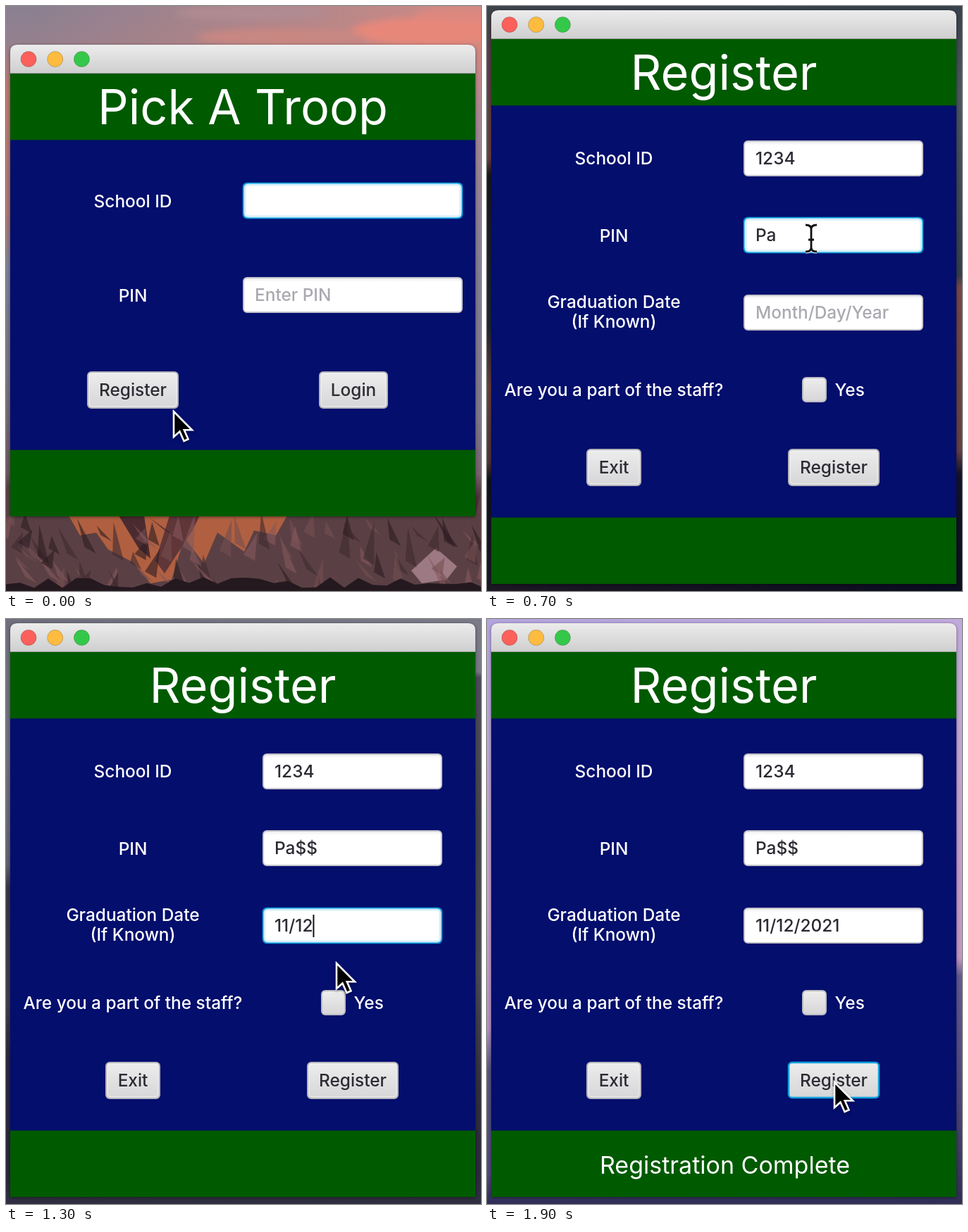
These frames come from a looping animation (674 by 831 pixels, 2 s). An HTML page:

```html
<!DOCTYPE html>
<html lang="en">
<head>
<meta charset="utf-8">
<title>Registration form</title>
<style>
  html, body { margin: 0; width: 100%; height: 100%; overflow: hidden; }
  #stage { position: relative; width: 674px; height: 831px; overflow: hidden; background: #111; }
  .wall, .wall div, svg { position: absolute; inset: 0; }
  .wall .right { mask-image: linear-gradient(90deg, transparent 5%, #000 95%); }
  svg { display: block; font: 450 24.4px Inter, sans-serif; font-optical-sizing: none; }
  .window { filter: drop-shadow(0 1px 2px #0007); }
</style>
</head>
<body>
<div id="stage"></div>
<script>
const STEP = 100, STEPS = 20;
const GREEN = '#005a00', BLUE = '#030e6d', INK = '#2b2b33', PROMPT = '#a9a9b0', FOCUS = '#0fa0dc';

// Wallpapers: step at which each is fully visible, vertical colours at the left and right edges
const walls = [
  { at: 0, left: '#8a8092 0,#94808e 6%,#b9776f 14%,#a87570 36%,#7c7f96 45%,#75707e 65%,#6b5560 80%,#49302f 84%,#3d272c',
    right: '#cb8a86 0,#cf8881 7%,#a58794 20%,#817d94 45%,#7d778a 70%,#77626e 80%,#4b3238 84%,#39252c' },
  { at: 1, left: '#a06f6c 0,#b9776f 12%,#a87570 30%,#7c7f96 45%,#75707e 65%,#6b5560 80%,#49302f 82%,#21191e',
    right: '#c3837f 0,#a58794 12%,#817d94 35%,#7d778a 70%,#77626e 80%,#4b3238 82%,#21191e' },
  { at: 4, left: '#a59aa5 0,#aa6049 3%,#a15540 28%,#2a2830 30%,#454a5a 40%,#4e5264 60%,#b0603f 65%,#a95739 77%,#171a2a 80%,#3a2524',
    right: '#ad9da8 0,#918097 10%,#6f677b 46%,#c46b50 47%,#bc6850 77%,#1e1b29 80%,#111522' },
  { at: 7, left: '#3d444c 0,#564046 8%,#694042 26%,#171721 29%,#202536 55%,#67403f 65%,#503438 78%,#101222 81%,#1d1724',
    right: '#38424c 0,#4d5560 15%,#343d4b 46%,#754846 48%,#663f43 76%,#11132a 80%,#0b0d20' },
  { at: 11, left: '#0b0b28 0,#10102c 30%,#0a0a1c 50%,#090a29 80%,#080927',
    right: '#0b0b28 0,#161524 25%,#0b0b16 55%,#0a0b20 80%,#080927' },
  { at: 15, left: '#d2d2d3 0,#cdcdce 25%,#b5b4b7 42%,#66616a 46%,#77717b 65%,#4a454f 75%,#4a464f 95%,#5a575e',
    right: '#e8e8e8 0,#e2e2e2 9%,#88868c 10%,#77737b 35%,#8b8790 60%,#57525c 80%,#4b4852 95%,#5a575e' },
  { at: 19, left: '#b3a5dd 0,#b7a5d5 20%,#c79dc9 50%,#b18fc4 70%,#575485 77%,#4c4a7b 95%,#302e58',
    right: '#c0a9dc 0,#c3a4d0 25%,#c596c0 58%,#625b8c 61%,#4c4979 80%,#302e58' },
];

const stage = document.getElementById('stage');
stage.innerHTML = walls.map(w =>
  `<div class="wall"><div style="background:linear-gradient(${w.left})"></div>
   <div class="right" style="background:linear-gradient(${w.right})"></div></div>`).join('') +
  '<svg width="674" height="831" viewBox="0 0 674 831"></svg>';
const wallNodes = stage.querySelectorAll('.wall');
const svg = stage.querySelector('svg');

const defs = `<defs>
  <linearGradient id="bar" x2="0" y2="1"><stop stop-color="#ececec"/><stop offset="1" stop-color="#cecece"/></linearGradient>
  <linearGradient id="button" x2="0" y2="1"><stop stop-color="#ededed"/><stop offset="1" stop-color="#d6d6d8"/></linearGradient>
  <linearGradient id="field" x2="0" y2="1"><stop stop-color="#ececee"/><stop offset=".12" stop-color="#fff"/></linearGradient>
  <filter id="soft"><feGaussianBlur stdDeviation="5"/></filter>
  </defs>`;

const polygon = (points, fill) => `<polygon points="${points}" fill="${fill}"/>`;

function drawScenery() {
  const random = i => { const s = Math.sin(i * 91.7 + 4.3) * 43758.5453; return s - Math.floor(s); };
  let out = `<g filter="url(#soft)">
    <ellipse cx="600" cy="36" rx="110" ry="20" fill="#e7877a"/>
    <ellipse cx="640" cy="12" rx="60" ry="9" fill="#dd887f"/>
    <ellipse cx="390" cy="44" rx="120" ry="12" fill="#c98782"/>
    <ellipse cx="350" cy="10" rx="110" ry="10" fill="#b08b92"/></g>`;
  out += polygon('0,690 8,676 6,724 666,724 674,690 674,831 0,831', '#5a4044');
  out += polygon('88,722 400,722 383,752 352,745 338,775 300,748 281,792 253,755 235,815 205,820 180,790 145,772 128,748 105,752', '#b06040');
  out += polygon('160,724 196,724 205,785 188,770', '#4b2b30');
  out += polygon('232,724 275,724 264,746 225,806 212,788', '#603638');
  out += polygon('575,802 610,770 640,796 625,815 590,820', '#9c7983');
  for (let i = 0; i < 90; i++) {
    const x = random(i) * 690 - 10, y = 718 + random(i + 100) * 95, h = 20 + random(i + 200) * 40;
    const lean = random(i + 300) * 44 - 18;
    const fill = ['#2c1c22', '#85595c', '#3f2a31', '#744e50'][i % 4];
    out += `<path d="M${x} ${y}l${12 + lean} ${h}l-16 -9z" fill="${fill}" opacity=".6"/>`;
  }
  let ridge = '0,831 0,815';
  for (let x = 0; x <= 680; x += 20) ridge += ` ${x},${811 + random(x + 7) * 17}`;
  return out + polygon(ridge + ' 674,831', '#24191f');
}
const scenery = drawScenery();

const text = (x, y, content, { fill = '#fff', size = 24.4, weight = 450, anchor = 'middle', id = '' } = {}) =>
  `<text x="${x}" y="${y}" fill="${fill}" font-size="${size}" font-weight="${weight}" text-anchor="${anchor}"${id && ` id="${id}"`}>${content}</text>`;

const box = (x, y, w, h, fill, stroke, width = 2) =>
  `<rect x="${x + 1}" y="${y + 1}" width="${w - 2}" height="${h - 2}" rx="5" fill="${fill}" stroke="${stroke}" stroke-width="${width}"/>`;

function field(x, y, w, value, prompt, focused) {
  const frame = focused
    ? box(x, y, w, 51, '#fff', FOCUS, 2.5) + box(x + 2, y + 2, w - 4, 47, 'none', '#d5effa', 3)
    : box(x, y, w, 51, 'url(#field)', '#c3c3cb');
  const shown = value || (focused ? '' : prompt);
  return frame + text(x + 17, y + 34, shown,
    { fill: value ? INK : PROMPT, anchor: 'start', id: focused ? 'typed' : '' });
}

function button(cx, y, w, label, focused) {
  const x = cx - w / 2;
  const frame = focused
    ? box(x, y, w, 52, 'url(#button)', FOCUS, 2.5)
    : box(x, y, w, 53, 'url(#button)', '#b4b4ba') + box(x + 2, y + 2, w - 4, 49, 'none', '#f3f3f3', 1);
  return frame + text(cx, y + 34.5, label, { fill: INK });
}

function windowFrame(top, bottom, title) {
  const head = top + 41, body = head + 95, foot = bottom - 94;
  const dots = ['#fc605b', '#fdbc40', '#34c84a'].map((color, i) =>
    `<circle cx="${32 + i * 37.7}" cy="${top + 20.5}" r="11" fill="${color}" stroke="#0003"/>`).join('');
  return `<g class="window"><path d="M6 ${head}V${top + 10}q0 -10 10 -10H656q10 0 10 10V${head}z" fill="url(#bar)"/>
    <rect x="6" y="${head}" width="660" height="${bottom - head}" fill="${GREEN}"/></g>
    <rect x="6" y="${body - 1}" width="660" height="${foot - body + 1}" fill="${BLUE}"/>
    <path d="M6 ${head - .5}H666" stroke="#9b9b9b"/>
    <path d="M6 ${body - .5}H666M6 ${foot - .5}H666" stroke="#08263a"/>
    ${dots}${text(336, top + 113, title, { size: 68.5, weight: 400 })}`;
}

const arrow = (x, y) => `<path transform="translate(${x} ${y})" d="M1 1V37L9.5 29.5L15.5 43L21.5 40.3L15.8 27.3H27z"
  fill="#000" stroke="#fff" stroke-width="2.6" style="filter:drop-shadow(0 2px 2px #0005)"/>`;

function beam(x, y) {
  const d = 'M-8 -19Q0 -19 0 -13V13Q0 19 -8 19M8 -19Q0 -19 0 -13M0 13Q0 19 8 19M-4 2H4';
  return ['stroke="#fff" stroke-width="5"', 'stroke="#111" stroke-width="2.8"']
    .map(style => `<path transform="translate(${x} ${y})" d="${d}" fill="none" ${style}/>`).join('');
}

// One pointer pose per step
const pointers = [
  [arrow, 237, 575], [arrow, 188, 547], [beam, 440, 219], [beam, 440, 219], [arrow, 452, 290],
  [beam, 460, 330], [beam, 460, 330], [beam, 460, 330], [beam, 460, 330], [beam, 460, 345],
  [beam, 466, 436], [arrow, 468, 488], [arrow, 468, 488], [arrow, 468, 488], [arrow, 468, 488],
  [arrow, 468, 488], [arrow, 468, 488], [arrow, 480, 575], [arrow, 492, 657], [arrow, 492, 657],
];

const entries = {
  id: { start: 2, end: 5, typed: ['', '12', '1234'] },
  pin: { start: 5, end: 10, typed: ['', 'P', 'Pa', 'Pa$', 'Pa$$'] },
  date: { start: 10, end: 18, typed: ['', '11', '11/', '11/12', '11/12/20', '11/12/202', '11/12/2021'] },
};

function entryField(step, { start, end, typed }, y, prompt) {
  const value = step < start ? '' : typed[Math.min(step - start, typed.length - 1)];
  return field(364, y, 255, value, prompt, step >= start && step < end);
}

const loginForm = () => windowFrame(55, 725, 'Pick A Troop') +
  text(180, 285.5, 'School ID') + field(336, 251, 312, '', 'Enter School ID', true) +
  text(180, 419.5, 'PIN') + field(336, 385, 312, '', 'Enter PIN', false) +
  button(180, 519, 130, 'Register') + button(493, 519, 98, 'Login');

const registerForm = step => windowFrame(6, 821, 'Register') +
  text(180, 225, 'School ID') + entryField(step, entries.id, 191, 'Enter School ID') +
  text(180, 334.5, 'PIN') + entryField(step, entries.pin, 300, 'Enter PIN') +
  text(180, 429, 'Graduation Date') + text(180, 457, '(If Known)') +
  entryField(step, entries.date, 410, 'Month/Day/Year') +
  text(180, 553.5, 'Are you a part of the staff?') +
  box(447, 527, 35, 36, 'url(#button)', '#bcbcc2') + text(493.5, 553.5, 'Yes', { anchor: 'start' }) +
  button(180, 629, 78, 'Exit', step === 1) + button(492, 629, 130, 'Register', step >= 18) +
  (step === 19 ? text(337.5, 787.5, 'Registration Complete', { size: 34, weight: 400 }) : '');

function showWalls(step) {
  wallNodes.forEach((node, i) => {
    const previous = walls[i - 1];
    const mix = previous ? (step - previous.at) / (walls[i].at - previous.at) : 1;
    node.style.opacity = Math.max(0, Math.min(1, mix));
  });
}

function render(step) {
  showWalls(step);
  const [pointer, x, y] = pointers[step];
  svg.innerHTML = defs + (step === 0 ? scenery + loginForm() : registerForm(step)) + pointer(x, y);
  if (step >= 11 && step <= 16) {
    const caretX = 382 + svg.querySelector('#typed').getComputedTextLength();
    svg.insertAdjacentHTML('beforeend', `<path d="M${caretX} 420V452" stroke="#111" stroke-width="2"/>`);
  }
}

let shown = -1;
const origin = performance.now();
function tick() {
  const step = Math.floor((performance.now() - origin) / STEP) % STEPS;
  if (step !== shown) render(shown = step);
  requestAnimationFrame(tick);
}
tick();
</script>
</body>
</html>
```
